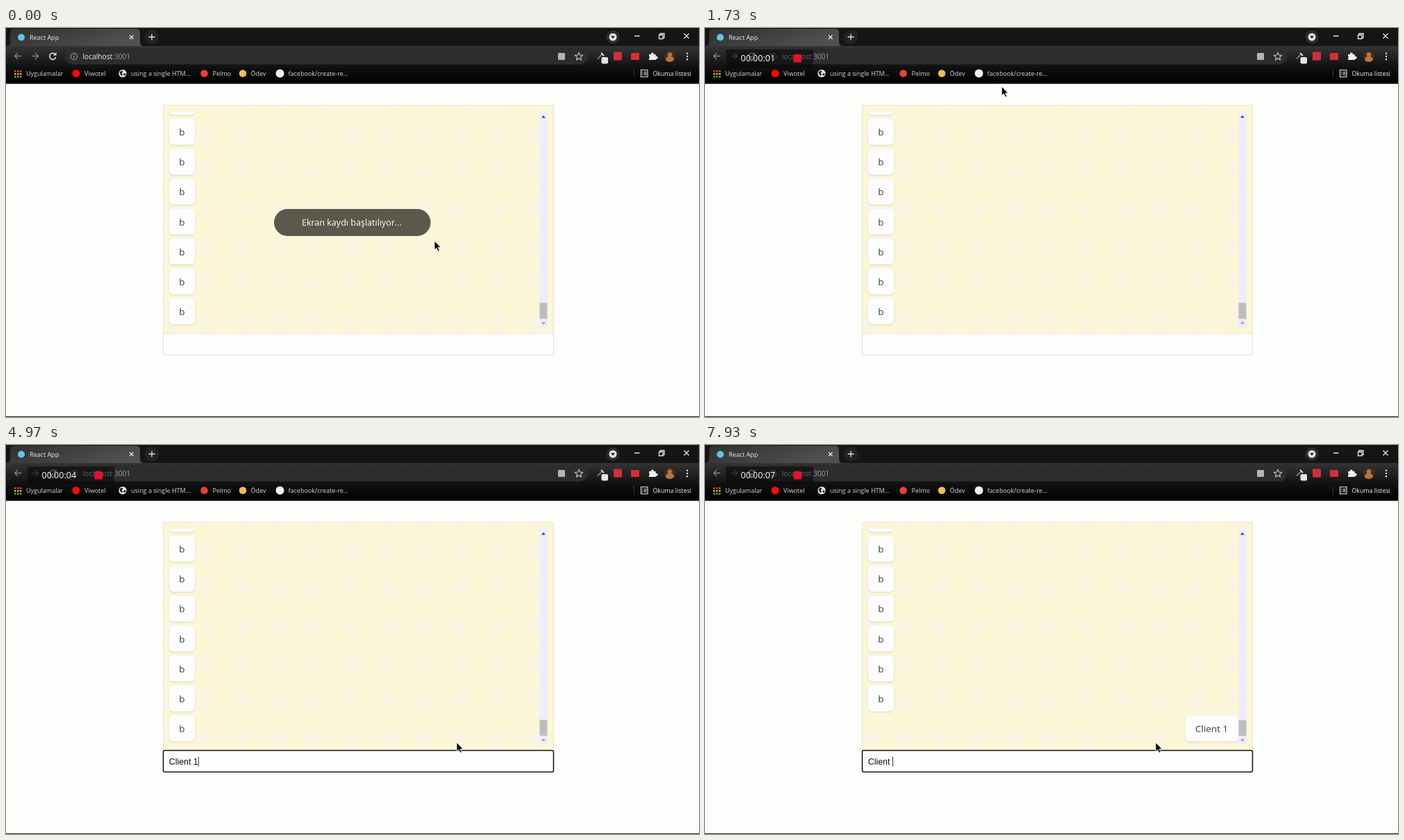
An HTML page for the animation above (8000 ms loop, 998 px wide and 561 px high).

```html
<!DOCTYPE html>
<html lang="tr">
<head>
<meta charset="utf-8">
<title>Chat demo</title>
<style>
  html, body { margin: 0; width: 100%; height: 100%; overflow: hidden; background: #fdfdfb; }
  svg { display: block; width: 100%; height: 100%; }
  text { font: 9px "Open Sans", "Noto Sans", sans-serif; fill: #d6d6d6; white-space: pre; }
  .msg { font-size: 13.5px; fill: #3a3a3a; }
  .field { font: 12.4px "Liberation Sans", Arial, sans-serif; fill: #111; }
  .line { fill: none; stroke: #e6e6e6; stroke-width: 1.3; }
  .bubble { fill: #fdfdfd; filter: drop-shadow(0 1px 1px #0002); }
</style>
</head>
<body>
<svg viewBox="0 0 998 561" preserveAspectRatio="none">
  <defs>
    <linearGradient id="tab" x2="1" y2="0.35">
      <stop stop-color="#2f2f2f"/><stop offset=".6" stop-color="#434343"/><stop offset="1" stop-color="#505050"/>
    </linearGradient>
    <linearGradient id="bar" x2="0" y2="1">
      <stop stop-color="#343434"/><stop offset=".55" stop-color="#111"/><stop offset="1" stop-color="#000"/>
    </linearGradient>
    <radialGradient id="spot">
      <stop stop-color="#fbf2e5"/><stop offset="1" stop-color="#fbf2e5" stop-opacity="0"/>
    </radialGradient>
    <pattern id="paper" x="262" y="126" width="52.4" height="53.7" patternUnits="userSpaceOnUse">
      <rect width="53" height="54" fill="#fbf7d7"/>
      <circle cx="26" cy="27" r="19" fill="url(#spot)"/>
    </pattern>
    <clipPath id="view"><rect x="230" y="121" width="551" height="311"/></clipPath>
  </defs>

  <rect width="998" height="561" fill="#fdfdfb"/>

  <!-- browser chrome -->
  <rect width="998" height="27" fill="#151513"/>
  <rect y="26" width="998" height="54.5" fill="url(#bar)"/>
  <path d="M0 26q6 0 6-6V7q0-6 6-6H187q6 0 6 6v13q0 6 6 6z" fill="url(#tab)"/>
  <circle cx="22" cy="13.500" r="5" fill="#5cc9e4"/>
  <text x="34" y="16.700" style="fill:#eee">React App</text>
  <path class="line" d="M178 10.500l5.500 5.500m0-5.500l-5.500 5.500"/>
  <circle cx="210" cy="13" r="10.500" fill="#222"/>
  <path class="line" d="M205.500 13h9m-4.500-4.500v9"/>
  <circle cx="874" cy="13" r="9.500" fill="#2c2c2c"/>
  <circle cx="874" cy="13" r="5.500" fill="#e4e4e4"/>
  <path d="M871 11.500h6l-3 4z" fill="#222"/>
  <path class="line" stroke-width="1" d="M905 11.500h7.500M940.500 10h5.500v5.500h-5.500zM942 10v-2h6v6h-2M976.500 8l7 7m0-7l-7 7"/>

  <path class="line" style="stroke:#858585" d="M22 40.500H12.500m4.500-4.500l-4.500 4.500 4.500 4.500M37 40.500h9.500m-4.500-4.500l4.500 4.500-4.500 4.500"/>
  <path class="line" style="stroke-width:1.600" d="M71 38a4.600 4.600 0 1 0 .8 4"/>
  <path d="M72.500 35v4.500h-4.500z" fill="#e6e6e6"/>
  <rect x="85" y="29" width="753" height="23.500" rx="11.700" fill="#2d2d2d"/>
  <circle cx="98" cy="41" r="4.700" class="line" style="stroke:#aaa;stroke-width:1"/>
  <path class="line" style="stroke:#aaa" d="M98 40.500v3m0-5.500v1.200"/>
  <text x="110.500" y="44.500" style="font-size:10.200px;fill:#f0f0f0">localhost<tspan fill="#9a9a9a">:3001</tspan></text>
  <rect x="795" y="36" width="10" height="10" rx="1" fill="#b4b4b4"/>
  <path class="line" style="stroke:#ccc;stroke-width:1.100" d="M825 35.500l1.600 3.600 3.900.4-2.900 2.600.8 3.900-3.400-2-3.400 2 .8-3.900-2.900-2.600 3.900-.4z"/>
  <path d="M852 44.500l6-6" stroke="#777" stroke-width="2"/>
  <path d="M857 36l4 4" stroke="#ddd" stroke-width="2"/>
  <rect x="857.500" y="42" width="9.500" height="9.500" rx="2" fill="#e3e3f2"/>
  <rect x="875" y="34.500" width="12" height="12" rx="1" fill="#cc3238"/>
  <rect x="900" y="36" width="12" height="10" rx="1" fill="#da2f32"/>
  <path d="M926 38h3a2 2 0 1 1 3.800 0h3v3a2 2 0 1 1 0 3.600V46h-9.800v-2.500a1.700 1.700 0 0 0 0-3z" fill="#f0f0f0"/>
  <circle cx="956" cy="41" r="8" fill="#4b2c18"/>
  <path d="M950 46.500q0-5 4-5.500a3.200 3.200 0 1 1 4 0q4 1 4 5a8 8 0 0 1-12 .5z" fill="#b8753f"/>
  <g fill="#e6e6e6"><circle cx="981" cy="36.800" r="1.200"/><circle cx="981" cy="41" r="1.200"/><circle cx="981" cy="45.200" r="1.200"/></g>

  <!-- bookmarks -->
  <g id="apps"></g>
  <text x="29" y="68.800">Uygulamalar</text>
  <circle cx="101" cy="65.500" r="5.500" fill="#f00d0d"/>
  <text x="113" y="68.800">Viwotel</text>
  <circle cx="168" cy="65.500" r="5.600" fill="#eee"/>
  <path d="M163.500 64q2-3 4-2.500l1 2-2 1.500 1.500 2-1 2.500q-3-2-3.500-5.500zM170 65l3 1-2 3-2-1.500z" fill="#222"/>
  <text x="180" y="68.800">using a single HTM...</text>
  <circle cx="285.500" cy="65.500" r="5.300" fill="#e04538"/>
  <text x="297.500" y="68.800">Pelmo</text>
  <circle cx="341" cy="65.500" r="5.300" fill="#f5b95c"/>
  <text x="352.500" y="68.800">Ödev</text>
  <circle cx="394.500" cy="65.500" r="6" fill="#f2f2f2"/>
  <text x="406.500" y="68.800">facebook/create-re...</text>
  <path d="M904.500 59v13" stroke="#333"/>
  <path class="line" d="M914.500 60.500h9.500v10h-9.500zM916 63.500h1m1.500 0h4M916 65.500h1m1.500 0h4M916 67.500h1m1.500 0h4" style="stroke-width:1.100"/>
  <text x="931.500" y="68.800" style="font-size:8.800px;fill:#f2f2f2">Okuma listesi</text>

  <!-- chat -->
  <rect x="226.500" y="111.500" width="562" height="329" fill="url(#paper)" stroke="#e8e5d2"/>
  <g clip-path="url(#view)">
    <g id="list"></g>
    <g id="sent">
      <rect class="bubble" x="692" y="389.800" width="76" height="37.500" rx="6"/>
      <text class="msg" x="706" y="414">Client 1</text>
    </g>
  </g>
  <rect x="768" y="121" width="12" height="311" fill="#eeeefa"/>
  <path d="M771 129.500h6l-3-3.500z" fill="#444"/>
  <path d="M771 424.300h6l-3 3.500z" fill="#999"/>
  <rect id="thumb" x="768.500" width="11" fill="#bdbdbd"/>
  <rect id="box" x="226.500" y="440.500" width="562" height="31" fill="#fdfdfd"/>
  <text id="typed" class="field" x="234.700" y="460.800"></text>
  <rect id="caret" y="449.500" width="1" height="14" fill="#222"/>
  <rect y="560" width="998" height="1" fill="#222"/>

  <!-- screen recorder -->
  <g id="toast">
    <rect x="386" y="261" width="225.500" height="39" rx="19.500" fill="#5b594b"/>
    <text x="498" y="285" text-anchor="middle" style="font-size:12.550px;fill:#fff">Ekran kaydı başlatılıyor...</text>
  </g>
  <g id="recorder">
    <rect x="30.500" y="31" width="125.500" height="26" fill="#0a0a0a" opacity=".62"/>
    <circle id="dot" cx="41.300" cy="43.500" r="2.500" fill="#e8112d"/>
    <text id="clock" x="51.500" y="48.200" style="font-size:12.500px;fill:#fff"></text>
    <rect x="127.500" y="38" width="11.500" height="11.500" rx="1.500" fill="#e8112d"/>
  </g>
  <path id="cursor" d="M0 0v13l3-2.700 2.100 4.800 2.200-1-2.100-4.600h4z" fill="#000" stroke="#fff" stroke-width=".8"/>
</svg>
<script>
  const LOOP = 8000, FOCUS = 2680, SEND = 5670;
  const $ = id => document.getElementById(id);
  const show = (el, on) => el.setAttribute("visibility", on ? "inherit" : "hidden");
  const set = (el, attrs) => { for (const k in attrs) el.setAttribute(k, attrs[k]); };

  // time, x, y
  const route = [
    [0, 617, 307], [770, 617, 307], [1030, 433, 64], [1330, 402, 52], [1470, 402, 52],
    [1730, 427, 84], [2170, 560, 270], [2300, 560, 270], [2730, 649, 429], [LOOP, 649, 429]
  ];
  const drafts = [
    { text: "Client 1", keys: [3530, 3670, 3830, 3970, 4130, 4400, 4530, 4800], end: SEND },
    { text: "Client ", keys: [6830, 6970, 7170, 7300, 7430, 7600, 7730], end: LOOP }
  ];

  const colors = ["#e5463c", "#f0b429", "#4caf50"];
  for (let i = 0; i < 9; i++) {
    $("apps").innerHTML += `<rect x="${12 + i % 3 * 4}" y="${61 + Math.floor(i / 3) * 4}" width="2.500" height="2.500" fill="${colors[Math.floor(i / 3)]}"/>`;
  }
  for (let i = -1; i < 7; i++) {
    const y = 131 + i * 43.130;
    $("list").innerHTML += `<g><rect class="bubble" x="235" y="${y}" width="37" height="37.500" rx="6"/>
      <text class="msg" x="253.300" y="${y + 24.200}" text-anchor="middle">b</text></g>`;
  }
  const lastB = $("list").lastElementChild;

  function pointAt(t) {
    const i = route.findIndex(p => p[0] > t);
    const [a, b] = [route[i - 1], route[i]];
    const u = (t - a[0]) / (b[0] - a[0]);
    return [1, 2].map(k => a[k] + (b[k] - a[k]) * u);
  }

  function drawField(t) {
    const focused = t >= FOCUS;
    set($("box"), focused
      ? { stroke: "#101010", "stroke-width": 1.5, rx: 2 }
      : { stroke: "#e2e2e2", "stroke-width": 1, rx: 0 });
    const draft = drafts.find(d => t < d.end);
    const pressed = draft.keys.filter(k => k <= t);
    $("typed").textContent = draft.text.slice(0, pressed.length);
    const lastInput = Math.max(FOCUS, t >= SEND ? SEND : 0, ...pressed);
    show($("caret"), focused && (t - lastInput) % 1000 < 480);
    const width = pressed.length ? $("typed").getComputedTextLength() : 0;
    $("caret").setAttribute("x", 234.700 + width);
  }

  function render(t) {
    const sent = t >= SEND;
    show(lastB, !sent);
    show($("sent"), sent);
    set($("thumb"), sent ? { y: 397, height: 22.500 } : { y: 396.300, height: 23 });
    drawField(t);

    $("toast").setAttribute("opacity", Math.min(1, Math.max(0, (900 - t) / 130)));
    show($("recorder"), t >= 900);
    show($("dot"), t % 1000 < 530);
    const seconds = Math.max(0, Math.floor((t - 5) / 1005));
    $("clock").textContent = "00:00:0" + seconds;
    $("cursor").setAttribute("transform", `translate(${pointAt(t)})`);
  }

  const start = performance.now();
  function tick() {
    render((performance.now() - start) % LOOP);
    requestAnimationFrame(tick);
  }
  tick();
</script>
</body>
</html>
```
